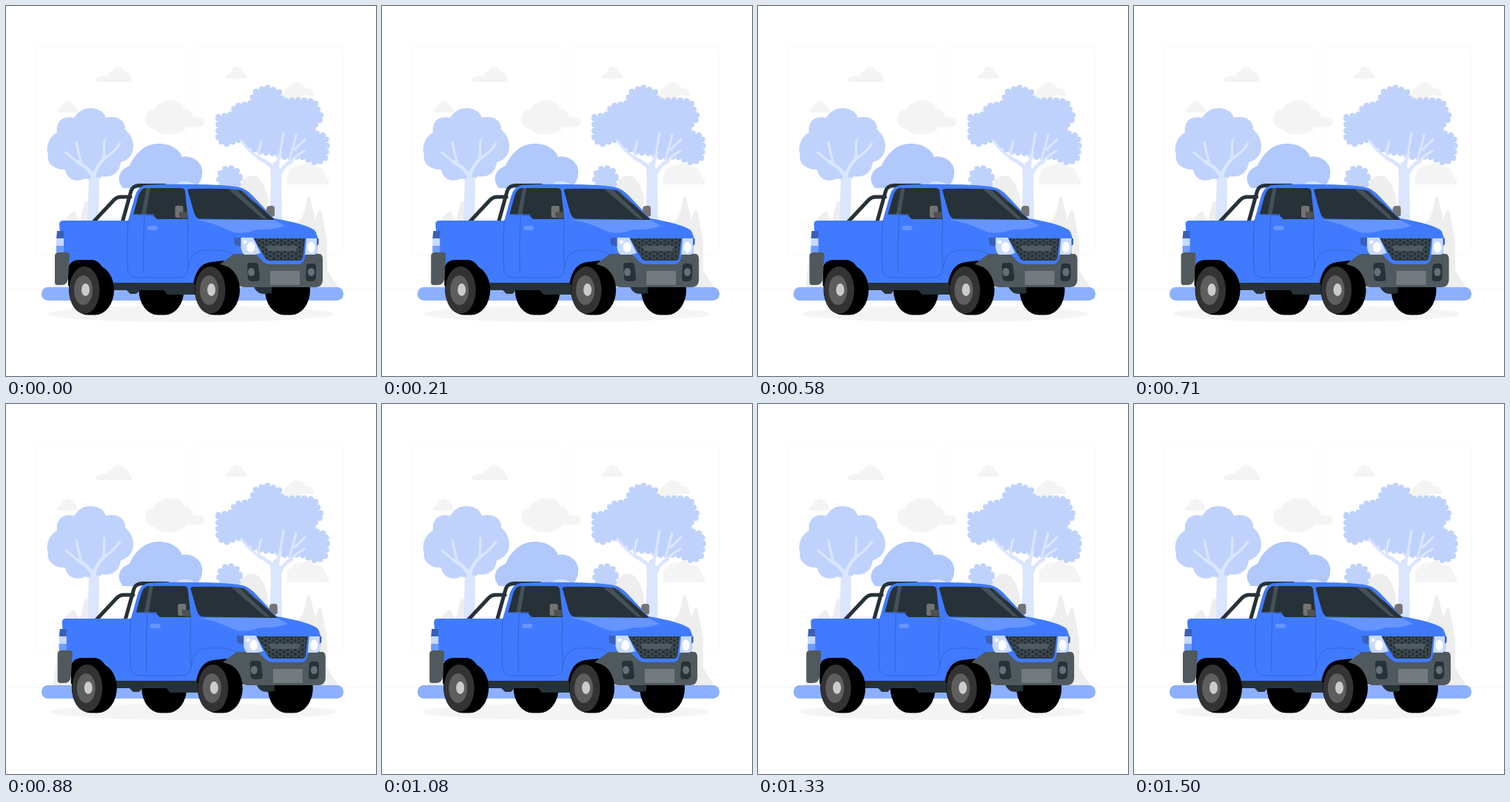
These frames come from a looping animation (500 px wide and 500 px high, 1.54 s). An HTML page:

```html
<!DOCTYPE html>
<html lang="en">
<head>
<meta charset="utf-8">
<title>Idling pickup</title>
<style>
html, body { margin: 0; height: 100%; overflow: hidden; background: #fff; }
svg { display: block; width: 100vw; height: 100vh; }
.line { fill: none; stroke-linecap: round; stroke-linejoin: round; }
.leafy { stroke-linecap: round; stroke-dasharray: 0 8.5; stroke-width: 8; }
</style>
</head>
<body>
<svg viewBox="0 0 500 500">
  <defs>
    <pattern id="mesh" width="10" height="6" x="337" y="314" patternUnits="userSpaceOnUse">
      <path class="line" stroke="#505c62" d="M0 3H1.7L3.3 0H6.7L8.3 3H10M1.7 3L3.3 6H6.7L8.3 3"/>
    </pattern>
    <rect id="tyre" x="-22" y="-34" width="61" height="67.5" rx="26" ry="33.7"/>
    <g id="wheel">
      <use href="#tyre"/>
      <ellipse cx="-1" rx="20.5" ry="32" fill="#333"/>
      <ellipse cx="-2.5" rx="12.5" ry="20" fill="#5e5e5e"/>
      <ellipse cx=".5" cy="-.5" rx="5.5" ry="8.5" fill="#ccc"/>
    </g>
  </defs>

  <g class="line" stroke="#f9f9f9">
    <path d="M39.5 55.5H242.5V337.5H39.5ZM255.5 55.5H456V337.5H255.5Z"/>
    <path stroke="#f3f3f3" d="M0 382.5H500"/>
  </g>

  <!-- clouds and distant plants -->
  <g fill="#f4f4f4">
    <path d="M124 103Q121 102 121 99Q122 95 127 96Q130 93 137 95Q138 88 144 88Q147 82 152 82Q158 82 160 88Q167 89 168 96Q171 98 169 103Z"/>
    <path d="M69 144Q69 138 75 137Q77 128 83 128Q89 128 91 134Q97 136 97 144Z"/>
    <path d="M200 166C184 163 184 143 200 140C207 124 235 123 241 138Q250 138 253 151Q267 149 269 157Q268 163 262 163H243C239 176 208 177 200 166Z"/>
    <path d="M297 98Q297 92 303 91Q305 83 312 82Q318 83 319 89Q325 91 325 98Z"/>
    <path d="M374 125Q374 113 381 110Q386 103 393 103Q402 104 405 111Q416 110 416 121H400V125Z"/>
    <path d="M380 241V228Q386 215 398 215Q409 209 418 217Q430 218 432 230Q437 234 436 241Z"/>
  </g>
  <g fill="#eee">
    <path d="M305 262Q311 246 318 239Q325 227 337 230Q349 236 354 260V320H305Z"/>
    <path d="M390 380L394 292Q404 285 406 263Q409 252 412 263L418 290Q423 268 427 280L434 318V357L449 380Z"/>
    <path d="M64 380L70 328L76 300Q82 280 93 278L99 295L106 266Q110 260 114 266L120 300L125 380Z"/>
  </g>

  <!-- trees -->
  <path fill="#b1c8fc" d="M158 246C148 234 153 221 167 216C174 200 187 186 206 186C224 186 235 195 238 204C254 201 268 214 265 228C264 239 257 246 245 248Z"/>
  <ellipse cx="242" cy="242" rx="12" ry="5" fill="#d5e2ff"/>
  <path fill="#bfd2fb" d="M69 171C67 155 78 148 92 151C98 143 103 138 114 138C125 138 132 143 135 151C150 147 162 155 161 167C171 175 174 188 171 197C168 206 160 210 155 211C154 224 144 233 130 230C124 237 113 235 107 233C96 239 82 235 80 221C66 222 54 212 57 201C53 191 58 177 69 171Z"/>
  <path class="leafy" fill="#bfd2fb" stroke="#bfd2fb" d="M287 150L303 147L311 135L330 132L337 116L352 110L369 116L373 128L398 127L417 129L422 142L427 151L414 164L416 171L432 176L434 190L431 207L419 212L398 203L380 205L362 199L346 198L332 193L325 184L313 181L297 187L287 181Z"/>
  <circle class="leafy" cx="302" cy="233" r="14" fill="#bfd2fb" stroke="#bfd2fb"/>
  <g fill="#dae5ff">
    <path d="M110 300L112 234L126 231L125 300ZM356 300L358 237L357 217L372 219L373 300Z"/>
    <g class="line" stroke="#dae5ff">
      <path stroke-width="8" d="M118 240V228M365 235V214"/>
      <path stroke-width="5" d="M117 230Q112 219 97 211M119 230Q121 217 134 205M364 222Q354 211 342 206M366 222Q367 208 371 199M369 230Q374 215 386 210"/>
      <path stroke-width="3.2" d="M98 212L81 198M102 214Q98 198 95 184M133 206Q146 198 154 186M132 207L133 181M344 207Q329 198 318 182M342 206Q341 192 345 183M370 202L375 171M384 211Q392 202 403 196M383 207Q389 187 392 175M390 194L404 180"/>
    </g>
  </g>
  <rect x="48" y="380" width="408" height="18" rx="8.5" fill="#8cafff"/>

  <g id="truck">
    <ellipse cx="249.5" cy="416" rx="193.5" ry="11" fill="#f4f4f4"/>
    <use href="#tyre" x="201.500" y="384"/>
    <use href="#tyre" x="372" y="384"/>

    <!-- chassis and roll bar -->
    <path fill="#263238" d="M130 350H300V377L258 390H218L213 384H181L176 389H168L163 384H130Z"/>
    <path class="line" stroke="#263238" stroke-width="5" d="M117 293L146 262Q150 258 155 258H168M157 293L169 250Q171 243 180 242.5H215"/>

    <!-- body -->
    <path fill="#407bff" d="M72 295Q72 290 77 290H165L174 258Q178 243 190 242Q220 240 247 241Q302 241 319 246Q326 249 333 256L362 287Q404 294 417 303Q421 308 421 318L420 338L400 349H352L308 337L293 350H274Q257 352 253 374H139L135 362Q129 345 113 344H94L83 350L76 340Z"/>
    <path fill="#6695ff" d="M256 289H362L377 297Q362 303 341 302Q326 308 309 306C294 301 283 293 256 289Z"/>

    <!-- windows -->
    <g fill="#263238">
      <path d="M172 282L178 260Q181 247 188 246H236Q241 246 242 250L246 288H204L199 283Z"/>
      <path d="M245.500 249Q246 247 250 247Q302 246 317 249Q321 250 324 254L363 289L261 287.500Q257 287 254 279Z"/>
    </g>
    <path fill="#455158" d="M190 246H195L189 282H183ZM301 248L312 248.500L353 288L346 287ZM316 249Q321 250 324 254L340 268L334 265Z"/>
    <path class="line" stroke="#407bff" stroke-width="1.200" d="M172 282H200"/>
    <rect x="228.500" y="270" width="11" height="16" rx="2.500" fill="#737373"/>
    <path fill="#505050" d="M234 278H243Q245 278 245 281V287H238Q234 286 234 282Z"/>
    <path fill="#737373" d="M352 275Q352 270 357 270H360Q363 270 363 274V282Q363 285 359 284L352 279Z"/>

    <!-- seams and handle -->
    <path class="line" stroke="#3165d8" d="M165 290Q163 325 164.500 356Q166 367 177 367H234Q245 367 246 356L248 347Q252 331 267 330H289Q302 331 308 336M187 284Q185 322 186 360M246 289Q244 322 246 355"/>
    <rect x="191" y="297" width="14" height="6" rx="3" fill="#6695ff"/>

    <!-- arches -->
    <path d="M84 377V352Q88 343 100 343H116Q128 344 134 361L138 376L130 390H90ZM254 376Q257 348 277 346L294 344L311 369L315 384H268Z"/>

    <!-- tail -->
    <path fill="#50595e" d="M66 338Q66 333 71 333H83Q86 333 86 337L84 368Q83 377 75 377H69Q66 377 66 373Z"/>
    <path fill="#3b5fb5" d="M69 304H78V315H68Z"/>
    <path fill="#c8daff" d="M68 314H78V325H68Z"/>
    <path fill="#6f9cff" d="M68 324H78V333H68Z"/>

    <!-- front -->
    <path fill="#263238" d="M335 380H359V388L350 389Q340 390 335 380Z"/>
    <path fill="#50595e" d="M289 349L308 335H337L346 344Q350 349 358 349H396Q403 348 405 335H424Q428 336 428 342V371Q427 380 418 380H322Q308 379 306 367Q302 351 289 349Z"/>
    <path fill="#407bff" d="M309 309Q323 309 336 303L407 306L421 311V316H405L402 344Q401 348 396 348H356Q349 347 346 341L334 316H309Z"/>
    <path fill="#c8daff" d="M317 313H334L344 334L336 336H322Q316 332 317 313ZM406 314H421L420 334L417 336H404Z"/>
    <path fill="#3b5fb5" d="M308 313H317.500V325L309 323ZM420 314H422.500V322L420 324Z"/>
    <g fill="#fff">
      <ellipse cx="331" cy="326" rx="5.500" ry="7"/>
      <ellipse cx="412.500" cy="326" rx="5" ry="7.500"/>
      <circle cx="323" cy="319" r="2.500"/>
    </g>
    <path fill="#263238" d="M335 314H404L401 340Q400 344 396 344H357Q352 344 350 340Z"/>
    <path fill="url(#mesh)" d="M337 314H403L400 340Q399 343 396 343H357Q352 343 350 340Z"/>
    <path fill="#4f5b62" d="M351 324H394L392 331H354Z"/>
    <rect x="357" y="358" width="40" height="19" fill="#737b7f"/>
    <g fill="#263238">
      <path d="M326 351Q326 347 330 347H337Q341 347 341 351L343 367Q343 372 338 372H332Q328 372 327 368Z"/>
      <path d="M406 352Q406 348 410 348H415Q419 348 419 353V367Q418 372 413 372H409Q405 372 405 367Z"/>
    </g>
    <g fill="#647077">
      <ellipse cx="331.500" cy="359.500" rx="4.500" ry="5.500"/>
      <ellipse cx="412.500" cy="359.500" rx="4.500" ry="5.500"/>
    </g>

    <use href="#wheel" x="107" y="384"/>
    <use href="#wheel" x="277" y="384"/>
  </g>
</svg>
<script>
const LOOP = 1540;
const truck = document.getElementById("truck");
// Sideways shake: [time in ms, offset in px]
const shake = [[0, 0], [150, -1], [300, 2], [430, -4], [590, 4], [740, -4],
  [885, 4], [1030, -4], [1170, 2], [1320, -0.8], [1500, 0], [LOOP, 0]];

function offsetAt(t) {
  const i = shake.findIndex(([end]) => end > t);
  const [t0, x0] = shake[i - 1], [t1, x1] = shake[i];
  return x0 + (x1 - x0) * (t - t0) / (t1 - t0);
}

function draw() {
  truck.setAttribute("transform", `translate(${offsetAt(performance.now() % LOOP)})`);
  requestAnimationFrame(draw);
}
draw();
</script>
</body>
</html>
```
